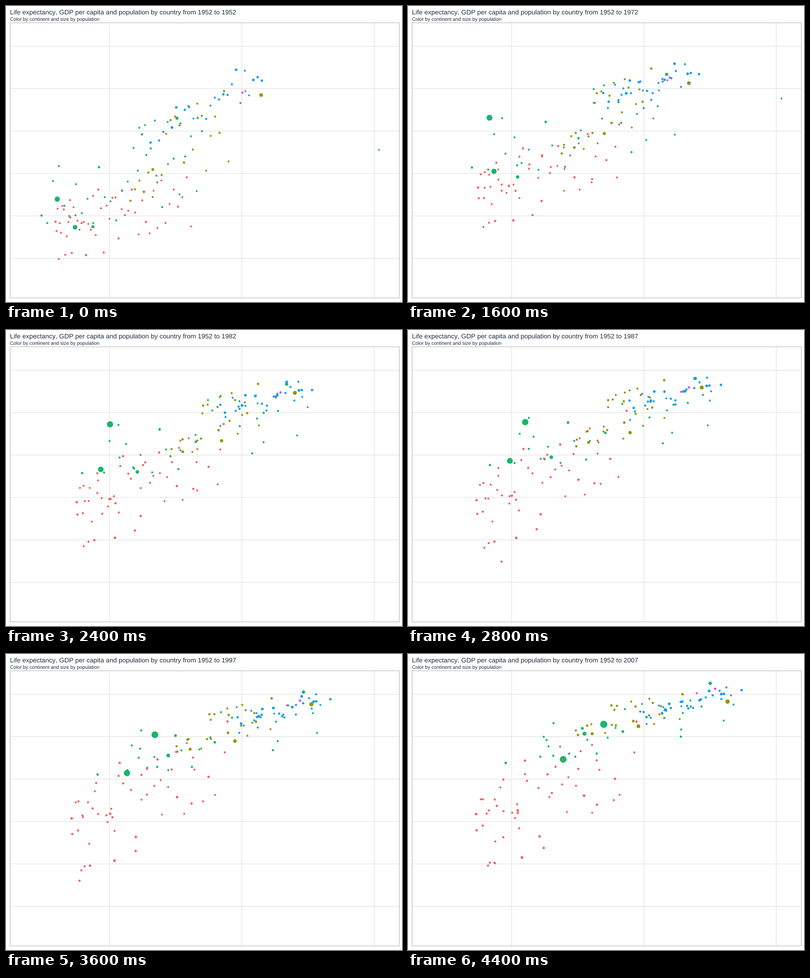
Write a matplotlib script that moves like this. It is 800 by 600 pixels and loops after 4800 ms.

```python
import numpy as np
import matplotlib.pyplot as plt
from matplotlib.animation import FuncAnimation

plt.rcParams["font.family"] = "Liberation Sans"
plt.rcParams["text.hinting"] = "none"
plt.rcParams["text.kerning_factor"] = 6

W, H, DPI = 800, 600, 100
PT = 72 / DPI
STEPS = 12
LEFT, TOP, RIGHT, BOTTOM = 8.25, 34, 794.5, 591.75
INK = "#1f2d3e"
RED, OLIVE, GREEN, BLUE, PINK = "#f35e5a", "#929705", "#18b56a", "#149bf3", "#df4ced"

steps = np.arange(STEPS)
progress = steps / (STEPS - 1)
rng = np.random.default_rng(7)
paths, sizes, colors = [], [], []


def smooth(t, v):
    """Cubic through a few points that does not overshoot them."""
    h, d = np.diff(t), np.diff(v) / np.diff(t)
    before, after = np.append(d[0], d), np.append(d, d[-1])
    m = np.gradient(v, t, edge_order=2)
    cap = 3 * np.minimum(abs(before), abs(after))
    steady = (before * after > 0) & (m * before > 0)
    m = np.where(steady, np.clip(m, -cap, cap), 0)
    i = np.clip(np.searchsorted(t, steps, side="right") - 1, 0, len(h) - 1)
    u = (steps - t[i]) / h[i]
    return (v[i] * (1 + 2 * u) * (1 - u) ** 2 + v[i + 1] * u * u * (3 - 2 * u)
            + h[i] * (m[i] * u * (1 - u) ** 2 - m[i + 1] * u * u * (1 - u)))


def tracks(keys):
    """Values at every step from rows of (step, value, ...)."""
    t, *values = np.array(keys, float).T
    return [smooth(t, v) for v in values]


def add(color, people, growth, x, y):
    paths.append(np.column_stack([x, y]) + 0.5)
    millions = people * growth ** (progress - 1)
    sizes.append(3.6 + 10.8 * np.sqrt(millions / 1319))
    colors.append(color)


def landmark(color, people, growth, *keys):
    add(color, people, growth, *tracks(keys))


def drift(start, end):
    return start + (end - start) * 0.15 * progress


def cloud(color, count, growth, skew, *keys):
    """Dots around a moving centre.
    Key: step, centre x and y, spread along x, rise with it, scatter in y."""
    cx, cy, spread, rise, scatter = tracks(keys)
    rank = np.linspace(-1.65, 1.65, count)
    noise = np.clip(rng.normal(size=(count, 2)), -1.7, 1.7)
    people = np.clip(np.exp(rng.normal(2.2, 1.1, count)), 0.3, 90)
    for r, (b0, b1), p in zip(rank, noise, people):
        a = drift(r, rng.uniform(-1.65, 1.65))
        b = drift(b0, b1)
        a = a + skew * (a * a - 1)
        add(color, p, growth, cx + spread * a, cy + rise * a + scatter * b)


# The most populous countries and the ones that travel on their own
landmark(OLIVE, 301, 1.9, (0, 515, 180), (4, 567, 156), (6, 583, 127), (11, 645, 96))
landmark(OLIVE, 190, 3.3, (0, 296, 331), (4, 396, 258), (6, 435, 224), (11, 465, 146))
landmark(GREEN, 1319, 2.4, (0, 103, 391), (2, 125, 386), (4, 164, 226),
         (8, 267, 178), (10, 341, 150), (11, 395, 142))
landmark(GREEN, 1110, 3, (0, 139, 448), (2, 160, 394), (6, 191, 282),
         (10, 274, 228), (11, 313, 213))
landmark(GREEN, 223, 2.7, (0, 175, 447), (4, 221, 346), (8, 310, 230), (11, 356, 161))
landmark(GREEN, 127, 1.5, (0, 345, 227), (4, 522, 138), (8, 591, 87), (11, 610, 59))
landmark(GREEN, 2, 9, (0, 753, 291), (2, 738, 249), (4, 754, 187), (6, 609, 156),
         (11, 657, 102))
landmark(RED, 9, 3.5, (0, 127, 425), (6, 194, 372), (8, 173, 566), (9, 148, 459),
         (11, 192, 371))
landmark(PINK, 20, 2.2, (0, 477, 175), (6, 554, 126), (11, 620, 70))
landmark(PINK, 4, 2.2, (0, 483, 172), (6, 542, 134), (11, 583, 79))

# The other countries, continent by continent
cloud(OLIVE, 23, 2.6, 0, (0, 350, 315, 60, -48, 58), (6, 420, 203, 60, -35, 38),
      (11, 443, 136, 76, -20, 25))
cloud(GREEN, 28, 3, 0, (0, 228, 371, 95, -45, 62), (6, 372, 228, 135, -45, 50),
      (11, 420, 161, 140, -40, 34))
cloud(BLUE, 30, 1.4, 0, (0, 391, 215, 76, -47, 24), (6, 519, 143, 60, -18, 15),
      (11, 565, 101, 66, -20, 9))
cloud(RED, 51, 3.8, 0.2, (0, 208, 433, 83, -12, 38), (6, 266, 325, 98, -32, 50),
      (8, 263, 308, 104, -42, 60), (11, 274, 298, 112, -40, 64))

paths, sizes = np.array(paths), np.array(sizes)

fig = plt.figure(figsize=(W / DPI, H / DPI), dpi=DPI, facecolor="white")
ax = fig.add_axes([0, 0, 1, 1])
ax.set(xlim=(0, W), ylim=(H, 0))
ax.axis("off")

grid = dict(color="#dedede", lw=PT, zorder=1, snap=False)
for i in range(6):
    y = 81.6 + 85.95 * i
    ax.plot([LEFT, RIGHT], [y, y], **grid)
for i in range(3):
    x = 209.2 + 267.4 * i
    ax.plot([x, x], [TOP, BOTTOM], **grid)
ax.add_patch(plt.Rectangle((LEFT, TOP), RIGHT - LEFT, BOTTOM - TOP, fill=False,
                           ec="#b3b3b3", lw=PT, zorder=4, snap=False))

title = ax.text(LEFT, 17.3, "", size=13.2 * PT, color=INK, va="baseline")
ax.text(LEFT, 30.2, "Color by continent and size by population",
        size=9.9 * PT, color=INK, va="baseline")
dots = ax.scatter(paths[:, 0, 0], paths[:, 0, 1], c=colors, linewidths=0, zorder=3)


def update(step):
    title.set_text("Life expectancy, GDP per capita and population by country "
                   f"from 1952 to {1952 + 5 * step}")
    dots.set_offsets(paths[:, step])
    dots.set_sizes((sizes[:, step] * PT) ** 2)
    return title, dots


anim = FuncAnimation(fig, update, frames=STEPS, interval=400, repeat=True,
                     repeat_delay=0)
plt.show()
```
